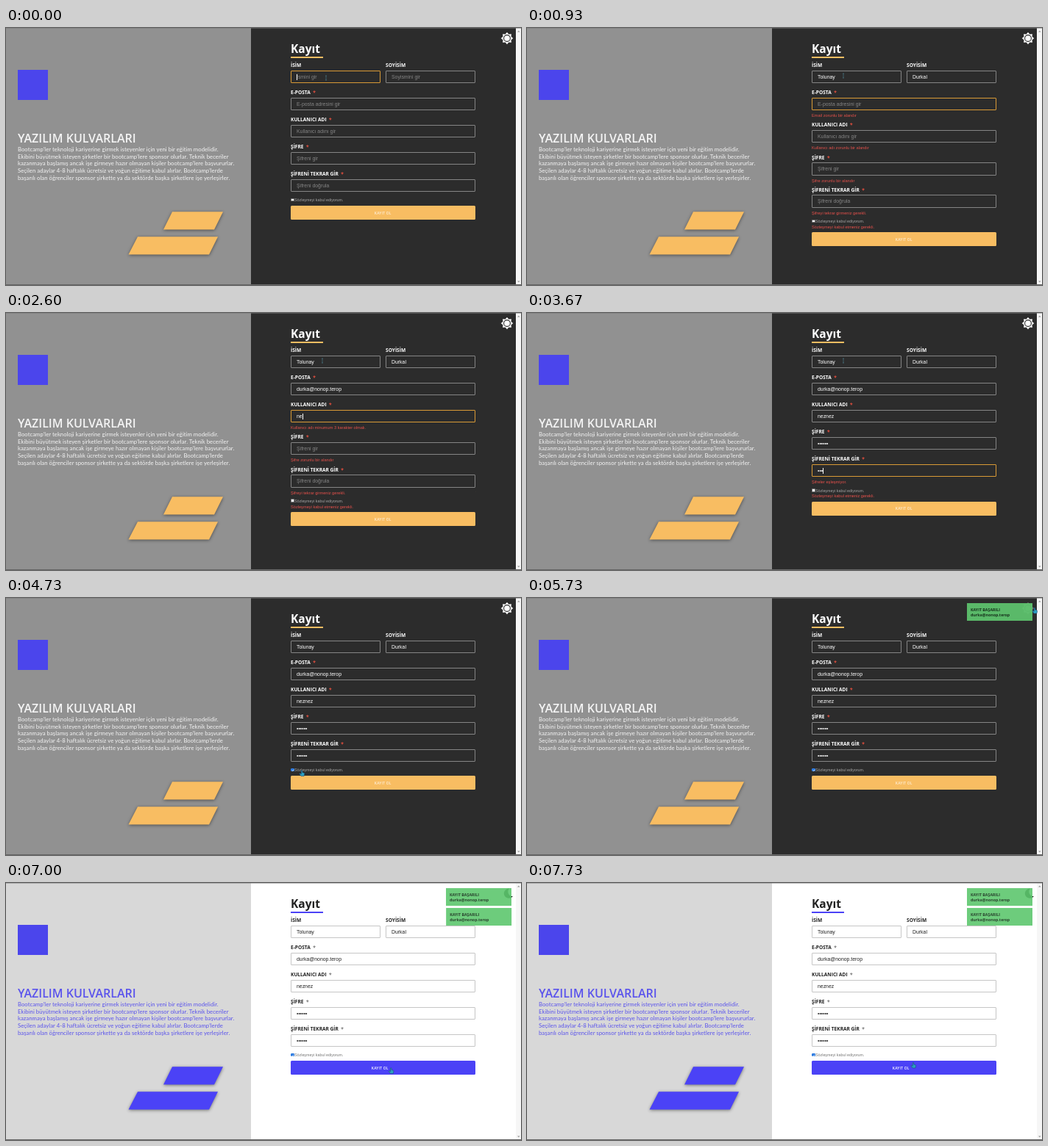
These frames come from a looping animation (700x350 px, 7790 ms). An HTML page:

```html
<!DOCTYPE html>
<html lang="tr">
<head>
<meta charset="utf-8">
<title>Kayıt</title>
<style>
html, body { margin: 0; width: 100%; height: 100%; overflow: hidden; }
#stage {
  --left: #919191; --right: #2c2c2c; --ink: #fff; --para: #f4f4f4; --accent: #f8bd62;
  --line: #858585; --hint: #858585; --star: #e8503f; --small: #a5a5a5;
  position: relative; width: 700px; height: 350px; overflow: hidden;
  background: var(--right); color: var(--ink); font-family: "Open Sans", sans-serif;
}
#stage.light {
  --left: #d8d8d8; --right: #fff; --ink: #222; --para: #5a53ec; --accent: #4b42f6;
  --line: #c6c6c6; --hint: #757575; --star: #777; --small: #777;
}
#stage div, #stage svg { position: absolute; box-sizing: border-box; white-space: pre; }
.text { line-height: 10px; }
#side { left: 0; top: 0; width: 332.5px; height: 350px; background: var(--left); }
#logo { left: 16px; top: 57px; width: 41px; height: 41px; background: #4b45ec; }
#slogan { left: 16px; top: 140px; font: 600 16px/20px "Open Sans", sans-serif; color: var(--para); }
#about { left: 16px; top: 160.7px; font: 400 7.7px/9.85px Lato, sans-serif; letter-spacing: .05px; color: var(--para); }
#shapes { left: 0; top: 0; fill: var(--accent); filter: drop-shadow(0 1.5px 2px #0007); }
#title { left: 387px; top: 17.5px; font: 700 15.5px/20px "Open Sans", sans-serif; }
#rule { left: 387px; top: 39.4px; width: 44px; height: 1.8px; background: var(--accent); }
.label { font-size: 6.6px; font-weight: 700; }
.label i { color: var(--star); font-style: normal; }
.input {
  height: 17.5px; border: 1px solid var(--line); border-radius: 1px; padding-left: 7px;
  font: 6.9px/16px "Liberation Sans", Arial, sans-serif;
}
.input.empty { color: var(--hint); }
.input.focus { border-color: #d99a36; }
.caret { top: 4.3px; width: .7px; height: 8px; background: var(--ink); }
.error { font: 5.65px/10px "Liberation Sans", Arial, sans-serif; color: #e4504b; }
#box { left: 387px; width: 4.6px; height: 4.6px; background: #fff; border: .5px solid #777; border-radius: 1px; }
#box.on { background: #2d7be0; border-color: #2d7be0; }
#box svg { left: 0; top: 0; display: none; }
#box.on svg { display: block; }
#terms { left: 392px; font: 5.35px/10px "Liberation Sans", Arial, sans-serif; color: var(--small); }
#button { left: 387px; width: 250.5px; height: 19px; background: var(--accent); border-radius: 1.5px; }
#caption {
  left: 0; width: 100%; top: 4.6px; text-align: center; color: #fff;
  font-size: 4.9px; font-weight: 600; letter-spacing: .25px; opacity: .75;
}
.light #caption { left: -4px; opacity: 1; }
#sun, #moon { left: 672px; top: 5px; }
#moon { display: none; }
.light #moon { display: block; }
.light #sun { display: none; }
.toast { left: 597.5px; width: 89.5px; height: 24px; background: #5fc870; color: #16331b; opacity: .91; }
.toast .text { left: 5.5px; font-size: 5.3px; font-weight: 700; }
#bar { left: 692.5px; top: 0; width: 7.5px; height: 350px; background: #f6f6f6; }
#edge { left: 0; top: 0; width: 700px; height: 350px; border: solid; border-width: 1px 0; border-color: #7777 #0000 #666; }
</style>
</head>
<body>
<div id="stage">
  <div id="side"></div>
  <div id="logo"></div>
  <div id="slogan">YAZILIM KULVARLARI</div>
  <div id="about">Bootcamp’ler teknoloji kariyerine girmek isteyenler için yeni bir eğitim modelidir.
Ekibini büyütmek isteyen şirketler bir bootcamp’lere sponsor olurlar. Teknik beceriler
kazanmaya başlamış ancak işe girmeye hazır olmayan kişiler bootcamp’lere başvururlar.
Seçilen adaylar 4-8 haftalık ücretsiz ve yoğun eğitime kabul alırlar. Bootcamp’lerde
başarılı olan öğrenciler sponsor şirkette ya da sektörde başka şirketlere işe yerleşirler.</div>
  <svg id="shapes" width="332" height="350"><path d="M226 250.3h69l-12 24.2h-69zM179 284.3h109l-12 24.2h-109.5z"/></svg>
  <div id="title">Kayıt</div>
  <div id="rule"></div>
  <div id="box"><svg width="4" height="4"><path d="M.7 1.9l.9.9L3.1.8" fill="none" stroke="#fff" stroke-width=".7"/></svg></div>
  <div id="terms">Sözleşmeyi kabul ediyorum.</div>
  <div id="button"><div id="caption" class="text">KAYIT OL</div></div>
  <svg id="sun" width="18" height="18" viewBox="-9 -9 18 18">
    <polygon fill="#fff"/>
    <circle r="4.4" fill="none" stroke="#2c2c2c" stroke-width="1.1"/>
  </svg>
  <svg id="moon" width="20" height="18" viewBox="-9 -9 20 18">
    <path d="M3-6.4A6.6 6.6 0 1 0 7.8 4A6.2 6.2 0 0 1 3-6.4z"/>
  </svg>
  <div id="bar"><svg width="8" height="350" fill="#999"><path d="M2 5.5l1.8-2 1.8 2zM2 344.5l1.8 2 1.8-2z"/></svg></div>
  <div id="edge"></div>
  <svg id="pointer" width="12" height="12" viewBox="-4 -4 12 12" overflow="visible">
    <path id="beam" d="M-1-3h2M0-3v6M-1 3h2" stroke="#4d8494" stroke-width=".6" fill="none"/>
    <path id="hand" d="M-.8-3.5q.8-.7 1.5 0V-1l2.4.7q.7.4.5 1.3L3 4H-1L-3.2.8q.4-1 1.4-.3l1 .7z" fill="#2aa0c0" stroke="#1d3f6e" stroke-width=".5"/>
  </svg>
</div>
<script>
const LOOP = 7790, GAP = 7.25, THEME = 5860, CHECK = 4550;
const MAIL = "durka@nonop.terop";
const stage = document.getElementById("stage");
const $ = id => document.getElementById(id);

function add(cls, parent = stage, style = {}) {
  const el = document.createElement("div");
  el.className = cls;
  for (const key in style) el.style[key] = style[key] + "px";
  return parent.appendChild(el);
}

// start: first key press, step: time per key, focus: [from, to]
const fields = [
  { label: "İSİM", hint: "İsmini gir", value: "Tolunay", start: 110, step: 45, focus: [0, 430], y: 51, w: 122 },
  { label: "SOYİSİM", hint: "Soyismini gir", value: "Durkal", start: 470, step: 45, focus: [430, 760], x: 516, y: 51, w: 122 },
  { label: "E-POSTA", hint: "E-posta adresini gir", value: MAIL, start: 1000, step: 65, focus: [760, 2380], y: 88,
    error: n => n == 0 ? "Email zorunlu bir alandır" : n < 16 ? "Geçerli bir email giriniz." : "" },
  { label: "KULLANICI ADI", hint: "Kullanıcı adını gir", value: "neznez", start: 2480, step: 90, focus: [2380, 2980], y: 125,
    error: n => n == 0 ? "Kullanıcı adı zorunlu bir alandır" : n < 3 ? "Kullanıcı adı minumum 3 karakter olmalı." : "" },
  { label: "ŞİFRE", hint: "Şifreni gir", value: "••••••", start: 3040, step: 50, focus: [2980, 3440], y: 162,
    error: n => n == 0 ? "Şifre zorunlu bir alandır" : n < 6 ? "Şifre minumum 6 karakter olmalı." : "" },
  { label: "ŞİFRENİ TEKRAR GİR", hint: "Şifreni doğrula", value: "••••••", start: 3500, step: 80, focus: [3440, CHECK], y: 199,
    error: n => n == 0 ? "Şifreyi tekrar girmeniz gerekli." : n < 6 ? "Şifreler eşleşmiyor." : "" }
];
for (const f of fields) {
  const left = f.x || 387;
  f.name = add("text label", stage, { left });
  f.name.innerHTML = f.label + (f.error ? " <i> *</i>" : "");
  f.input = add("input", stage, { left, width: f.w || 250.5 });
  f.text = document.createElement("span");
  f.input.append(f.text);
  f.caret = add("caret", f.input);
  f.note = add("error", stage, { left });
}
const termsNote = add("error", stage, { left: 387 });

const toasts = [[5300, 7], [6780, 34.4]].map(([start, top]) => {
  const el = add("toast", stage, { top });
  add("text", el, { top: 3.6 }).textContent = "KAYIT BAŞARILI";
  add("text", el, { top: 10.6 }).textContent = MAIL;
  return { el, start };
});
stage.append($("pointer"));

$("sun").firstElementChild.setAttribute("points", Array.from({ length: 16 }, (_, i) => {
  const r = i % 2 ? 6 : 8.3, a = i * Math.PI / 8;
  return [r * Math.cos(a), r * Math.sin(a)].map(v => v.toFixed(2));
}).join(" "));

// time, x, y
const path = [
  [0, 435, 68], [300, 435, 68], [800, 430, 65], [4080, 430, 65], [4450, 389, 241], [4650, 389, 237],
  [5050, 512, 252], [5330, 512, 252], [5680, 690, 17], [5900, 690, 17], [6340, 523, 257],
  [6900, 523, 257], [7300, 525, 248], [LOOP, 525, 248]
];
const clamp = v => Math.min(1, Math.max(0, v));

function pointerAt(t) {
  const i = path.findIndex(p => p[0] > t);
  const [a, b] = [path[i - 1], path[i]];
  const k = (t - a[0]) / (b[0] - a[0]), e = k * k * (3 - 2 * k);
  return [a[1] + (b[1] - a[1]) * e, a[2] + (b[2] - a[2]) * e];
}

function drawFields(t) {
  let shift = 0;
  for (const f of fields) {
    const n = t < f.start ? 0 : Math.min(f.value.length, 1 + Math.floor((t - f.start) / f.step));
    const focus = t >= f.focus[0] && t < f.focus[1];
    const y = f.y + shift;
    f.name.style.top = y - 4.8 + "px";
    f.input.style.top = y + 6.7 + "px";
    f.input.className = "input" + (n ? "" : " empty") + (focus ? " focus" : "");
    f.text.textContent = n ? f.value.slice(0, n) : f.hint;
    f.caret.hidden = !focus || Math.floor(t / 530) % 2 == 1;
    f.caret.style.left = (n ? 7.2 + f.text.offsetWidth : 7) + "px";
    f.note.textContent = f.error && t >= 760 ? f.error(n) : "";
    f.note.style.top = y + 26 + "px";
    if (f.note.textContent) shift += GAP;
  }
  return shift;
}

function draw(t) {
  stage.className = t >= THEME ? "light" : "";
  let shift = drawFields(t);
  const missing = t >= 760 && t < CHECK;
  $("box").className = t >= CHECK ? "on" : "";
  $("box").style.top = 231.7 + shift + "px";
  $("terms").style.top = 229.3 + shift + "px";
  termsNote.textContent = missing ? "Sözleşmeyi kabul etmeniz gerekli." : "";
  termsNote.style.top = 237 + shift + "px";
  if (missing) shift += GAP;
  $("button").style.top = 242 + shift + "px";
  $("button").style.opacity = 1 - .68 * clamp((t - 6250) / 100) * (1 - clamp((t - 6780) / 200));

  $("sun").style.opacity = 1 - .7 * clamp((t - 5680) / 50);
  for (const { el, start } of toasts) {
    const k = clamp((t - start) / 250);
    el.hidden = t < start;
    el.style.transform = `translateX(${100 * (1 - k) ** 3}px)`;
  }
  const [x, y] = pointerAt(t);
  $("pointer").style.transform = `translate(${x - 4}px, ${y - 4}px)`;
  $("beam").style.display = t < 4200 ? "" : "none";
  $("hand").style.display = t < 4200 ? "none" : "";
}

const begin = performance.now();
function tick() {
  draw((performance.now() - begin) % LOOP);
  requestAnimationFrame(tick);
}
tick();
</script>
</body>
</html>
```
